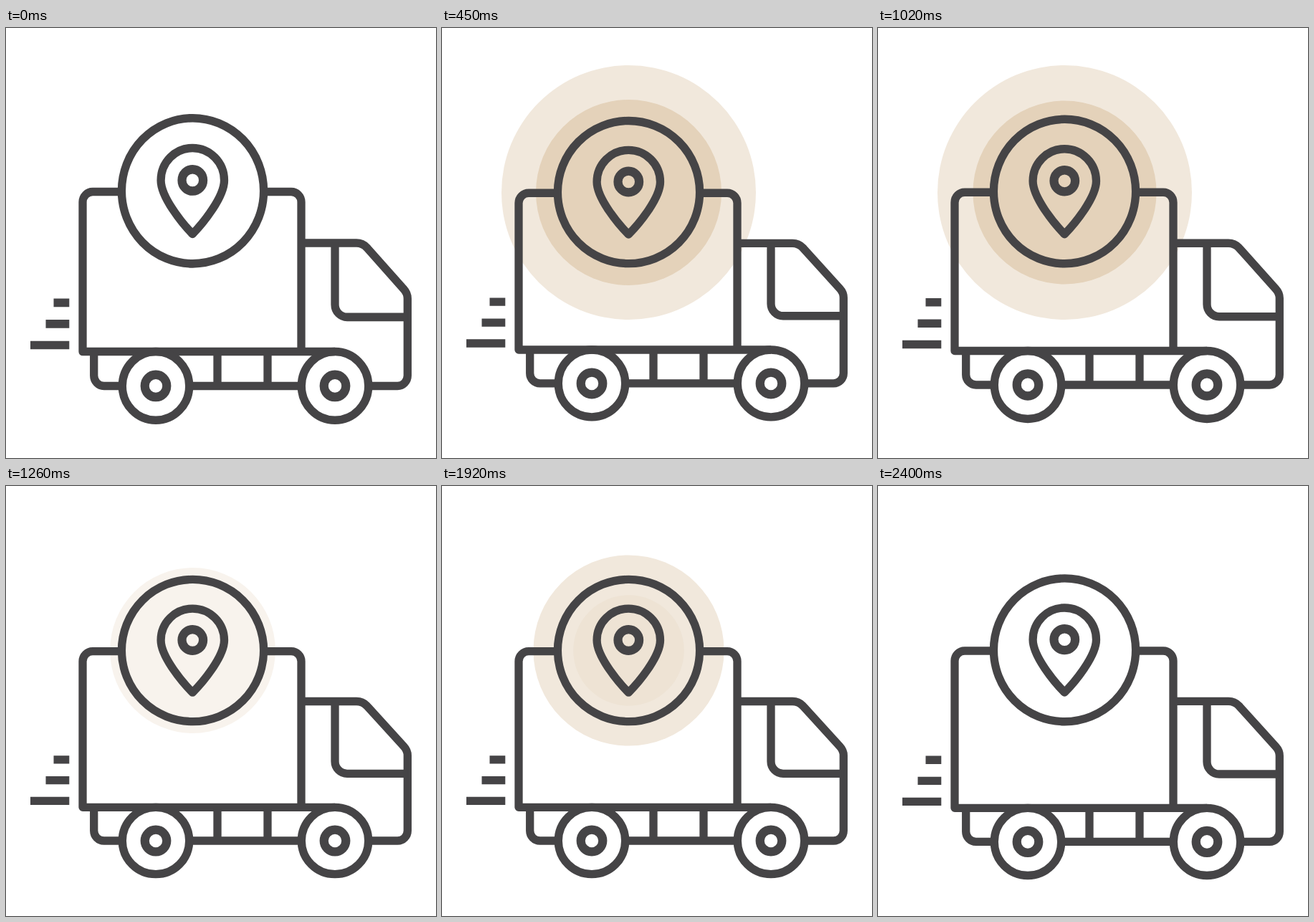
Write an HTML page that moves like this. It is 600x600 px and loops after 2.43 s.

```html
<!DOCTYPE html>
<html lang="en">
<head>
<meta charset="utf-8">
<title>Delivery truck</title>
<style>
  html, body { margin: 0; width: 100%; height: 100%; overflow: hidden; background: #fff; }
  svg { display: block; width: 100%; height: 100%; }
  #truck { fill: none; stroke: #454446; stroke-width: 11.3; stroke-linejoin: round; }
  .hub { stroke-width: 12.2; }
</style>
</head>
<body>
<svg viewBox="0 0 600 600">
  <circle id="outer" cx="260.5" cy="229.5" fill="#f1e8dc"/>
  <circle id="inner" cx="260.5" cy="229.5" fill="#e4d2ba"/>
  <g id="truck">
    <!-- speed lines -->
    <path d="M66.5 381.8H88.3M55.5 410.6H88.3M34 439.4H88.3"/>
    <!-- cargo box -->
    <path d="M160 230.7H121a14 14 0 0 0-14 14V448.3H459M361 230.7H398a14 14 0 0 1 14 14V448.3"/>
    <!-- cab and window -->
    <path d="M412 300.5H489Q497.5 300.5 503.5 306.7L555 363.3Q560.3 369 560.3 376V481a14 14 0 0 1-14 14H508"/>
    <path d="M459 300.5V384.3a17 17 0 0 0 17 17H560.3"/>
    <!-- chassis -->
    <path d="M122.7 448.3V481a14 14 0 0 0 14 14H161M257 495H411M295 448.3V495M365 448.3V495"/>
    <!-- wheels -->
    <g id="wheel">
      <circle cx="209" cy="495" r="46.7"/>
      <circle class="hub" cx="209" cy="495" r="15.3"/>
    </g>
    <use href="#wheel" x="250"/>
    <!-- badge and pin -->
    <circle cx="260.5" cy="229.5" r="99.1"/>
    <path d="M260.3 288.2C246 274 216.1 238 216.1 215.3a44.2 44.2 0 0 1 88.4 0C304.5 238 274.6 274 260.3 288.2Z"/>
    <circle class="hub" cx="260.3" cy="215" r="14.8"/>
  </g>
</svg>
<script>
const LOOP = 2430, STEP = 30;
const PULSE = 600, GROW = 360, FADE = 120;
const AXIS = 318, STRETCH = 0.025;

// Times at which the body turns: fully stretched, at rest, stretched, ...
const TURNS = [0, 640, 870, 1250, 1565, 1910, 3200];

const byId = id => document.getElementById(id);
const truck = byId('truck');
const rings = [
  { el: byId('outer'), size: 177.5, delay: 0 },
  { el: byId('inner'), size: 129.5, delay: 90 }
];

const clamp = x => Math.min(1, Math.max(0, x));
const easeOut = x => 1 - (1 - x) ** 1.5;

function bounce(t) {
  const i = TURNS.findIndex(turn => turn > t) - 1;
  const u = (t - TURNS[i]) / (TURNS[i + 1] - TURNS[i]);
  return (1 + Math.cos(Math.PI * (i + u))) / 2;
}

function draw(t) {
  const phase = t % PULSE;
  const fadeOut = clamp((PULSE - phase) / FADE);
  for (const { el, size, delay } of rings) {
    const age = phase - delay;
    el.setAttribute('r', size * (0.54 + 0.46 * easeOut(clamp(age / GROW))));
    el.setAttribute('opacity', clamp(age / FADE) * fadeOut);
  }
  const scale = 1 + STRETCH * bounce(t);
  truck.setAttribute('transform', `matrix(1 0 0 ${scale} 0 ${AXIS * (1 - scale)})`);
}

const start = performance.now();
function frame() {
  const t = (performance.now() - start) % LOOP;
  draw(Math.floor(t / STEP) * STEP);
  requestAnimationFrame(frame);
}
frame();
</script>
</body>
</html>
```
